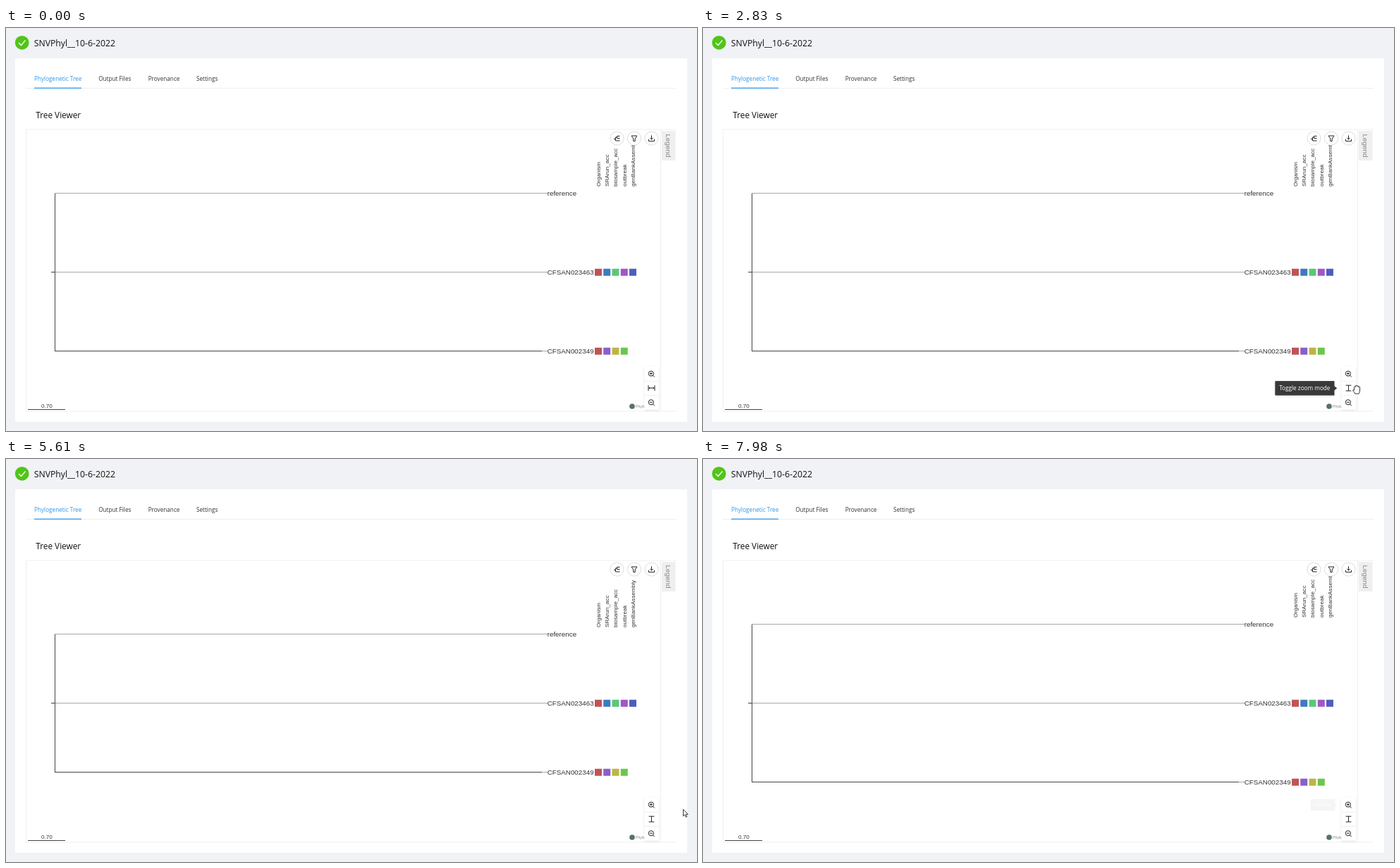
These frames come from a looping animation (980 px wide and 572 px high, 8900 ms). An HTML page:

```html
<!DOCTYPE html>
<html lang="en">
<head>
<meta charset="utf-8">
<title>Tree Viewer</title>
<style>
  html, body { margin: 0; width: 100%; height: 100%; overflow: hidden; background: #f0f2f5; }
  svg { display: block; width: 980px; height: 572px; }
  .ui { font-family: "Open Sans", "Noto Sans", sans-serif; }
  .head { font-weight: 500; fill: #111; }
  .plot { font-family: "Liberation Sans", Arial, sans-serif; fill: #333; }
  .line { fill: none; stroke: #222; }
  .soft { fill: none; stroke: #efefef; }
  .thin { fill: none; stroke: #a8a8a8; }
  .dark { fill: none; stroke: #444; }
  .mid { text-anchor: middle; }
</style>
</head>
<body>
<svg viewBox="0 0 980 572">
  <defs>
    <filter id="shade" x="-30%" y="-30%" width="160%" height="160%">
      <feDropShadow dx="0" dy="1" stdDeviation="1.5" flood-opacity=".14"/>
    </filter>
  </defs>
  <rect width="980" height="572" fill="#f0f2f5"/>
  <rect x="13" y="43" width="953" height="516" fill="#fff"/>

  <circle cx="22.7" cy="20.8" r="9.9" fill="#52c41a"/>
  <path d="M18 21l3.5 3.5 6-7" fill="none" stroke="#fff" stroke-width="1.3"/>
  <g class="ui">
    <text class="head" x="39.7" y="25.5" font-size="12.25">SNVPhyl__10-6-2022</text>
    <text class="head" x="42.3" y="128" font-size="11.8">Tree Viewer</text>
    <g id="tabs" font-size="8.2" fill="#333"></g>
  </g>
  <path class="soft" d="M28 85.5H951"/>
  <rect x="40" y="84.6" width="67" height="1.4" fill="#3f9cec"/>

  <path class="soft" d="M951 144H28.5V544H951M928.5 144V544"/>
  <rect x="930" y="146" width="19.5" height="42" fill="#efefef"/>
  <text class="plot" transform="translate(936.3 150.5) rotate(90)" font-size="9.9" style="fill:#858585">Legend</text>

  <g id="tree"></g>
  <path class="dark" d="M31 541.5H84"/>
  <text class="plot mid" x="57.8" y="539" font-size="8.1">0.70</text>
  <circle cx="888" cy="537" r="3.8" fill="#56716b"/>
  <text class="plot" x="893" y="539" font-size="5.2" style="fill:#888">Phylocanvas</text>

  <g fill="#fff" stroke="#dcdcdc">
    <circle cx="866.5" cy="156.6" r="9.6"/>
    <circle cx="891" cy="156.6" r="9.6"/>
    <circle cx="915.5" cy="156.6" r="9.6"/>
  </g>
  <g class="line">
    <path d="M870.6 153.4H866.6V156.6H870.6M866.6 155H864.5V160H870.6M862 157.6H864.5"/>
    <path d="M887 153H895L892.2 157V160.6H889.8V157Z"/>
    <path d="M915.5 152.3V158M913.3 156L915.5 158.2L917.7 156M911.5 157.8V160.6H919.5V157.8"/>
  </g>

  <rect x="905.5" y="480.5" width="20" height="61" rx="1.5" fill="#fff" filter="url(#shade)"/>
  <path class="soft" d="M906 501.2H925M906 521.4H925"/>
  <g class="line">
    <path id="wide" d="M911 507.2V515M920 507.2V515M911.5 511H919.5M913.3 509.8L912 511L913.3 512.2M917.7 509.8L919 511L917.7 512.2"/>
    <path id="tall" d="M911.6 507.2H919.4M911.6 515H919.4M915.5 507.2V515"/>
    <circle cx="914.9" cy="490.5" r="3.6"/>
    <path d="M917.5 493.1L919.8 495.4M913 490.5H916.8M914.9 488.6V492.4"/>
    <circle cx="914.9" cy="531.2" r="3.6"/>
    <path d="M917.5 533.8L919.8 536.1M913 531.2H916.8"/>
  </g>

  <g id="tips" class="ui"></g>
  <circle id="spot" r="7.7" fill="#fe0" fill-opacity=".6"/>
  <g id="cursor" fill="#fff" stroke="#222" stroke-width=".9" stroke-linejoin="round">
    <path id="arrow" d="M0 0V9.6L2.2 7.6L3.8 11.2L5.3 10.5L3.8 7.1H6.8Z"/>
    <path id="point" d="M-1.4 .6A1.4 1.4 0 0 1 1.4 .6V4.6L5 5.4Q6.8 6 6.7 8L5.5 13H-.3Q-1.2 10.8-3.6 8Q-3.8 6.2-1.4 7.2Z"/>
    <path id="grab" d="M-3.3 1V-3.4A1 1 0 0 1-1.3-3.4V-4.8A1 1 0 0 1 .7-4.8V-4.3A1 1 0 0 1 2.7-4.3V-3A1 1 0 0 1 4.7-3V2Q4.6 4 3.2 6H-2Q-3 4-5.2 1.6Q-5.6-.2-3.3 1Z"/>
  </g>
</svg>
<script>
const LOOP = 8900, MID = 346.5, HALF = 112, SHRINK = .934;
const $ = id => document.getElementById(id);

function add(parent, tag, attrs, text) {
  const el = document.createElementNS("http://www.w3.org/2000/svg", tag);
  for (const k in attrs) el.setAttribute(k, attrs[k]);
  if (text) el.textContent = text;
  return parent.appendChild(el);
}
const show = (el, on) => el.setAttribute("display", on ? "inline" : "none");
const move = (el, x, y) => el.setAttribute("transform", `translate(${x} ${y})`);
const clamp = v => Math.max(0, Math.min(1, v));

function addTab(x, label, fill = "#333") {
  add($("tabs"), "text", { x, y: 75, fill }, label);
}
addTab(40, "Phylogenetic Tree", "#2f96ec");
addTab(131.2, "Output Files");
addTab(201.7, "Provenance");
addTab(270, "Settings");

// Tree: the outer rows slide with the vertical zoom, the middle row stays
const tree = $("tree");
const stem = add(tree, "path", { class: "dark" });
const colX = i => 840 + 12.25 * i;

function addRow(name, colors, black) {
  const g = add(tree, "g", {});
  add(g, "path", { class: "thin", d: "M70 0H768" });
  if (black) add(g, "path", { class: "dark", d: "M69 0H760" });
  add(g, "text", { class: "plot", x: 767.7, y: 3.3, "font-size": 9.8 }, name);
  colors.forEach((fill, i) =>
    add(g, "rect", { x: colX(i) - 5, y: -4.8, width: 10, height: 10, fill }));
  return g;
}
const upper = addRow("reference", []);
const middle = addRow("CFSAN023463", ["#c05357", "#3f7ac0", "#58c878", "#a257c4", "#505dbc"]);
const lower = addRow("CFSAN002349", ["#c05357", "#8a5fca", "#bdb544", "#6cc64e"], true);
["Organism", "SRArun_acc", "biosample_acc", "outbreak", "genBankAssembly"].forEach((s, i) =>
  add(upper, "text", {
    class: "plot", "font-size": 8.1,
    transform: `translate(${colX(i) + 2.8} -9.5) rotate(-90)`
  }, s));
move(middle, 0, MID);

// Clicks: each zoom step lands halfway through its highlight
const toggle = { from: 1920, to: 2020, zoom: 0 };
const clicks = [
  toggle,
  { from: 3860, to: 3940, zoom: 1 },
  { from: 4700, to: 4830, zoom: 1 },
  { from: 6360, to: 6570, zoom: -1 },
  { from: 7120, to: 7250, zoom: -1 }
];

function drawTree(t) {
  const level = clicks.reduce((n, c) => n + (t >= (c.from + c.to) / 2 ? c.zoom : 0), 0);
  const half = Math.round(HALF * SHRINK ** level);
  move(upper, 0, MID - half);
  move(lower, 0, MID + half);
  stem.setAttribute("d", `M69.5 ${MID - half}V${MID + half}M64 ${MID}H69.5`);
}

// Tooltips grow from the arrow tip while fading; "rest" is what stays visible
function addTip(text, y, w, start, end, rest = 0) {
  const el = add($("tips"), "g", {});
  add(el, "path", {
    d: `M-4 -10.2H${-3 - w}q-1.2 0-1.2 1.2V9q0 1.2 1.2 1.2H-4V3L-.3 0L-4 -3Z`,
    fill: "#000", "fill-opacity": .75, filter: "url(#shade)"
  });
  add(el, "text", { class: "mid", x: -4.2 - w / 2, y: 3, "font-size": 8.2, fill: "#fff" }, text);
  return t => {
    const grow = 1 - (1 - clamp((t - start) / 100)) ** 4;
    const on = grow * Math.max(rest, 1 - clamp((t - end) / 100));
    show(el, on > 0);
    el.setAttribute("opacity", on);
    el.setAttribute("transform", `translate(899.5 ${y}) scale(${.8 + .2 * on})`);
  };
}
const tips = [
  addTip("Toggle zoom mode", 511.2, 84, 1270, 3040),
  addTip("Zoom out", 531.6, 45.5, 3600, 5430),
  addTip("Zoom in", 491, 42.5, 6070, 7885, .05)
];

// Pointer trips: curves from a to b, bent towards via; it rests at b
const trips = [
  { from: 380, to: 1130, a: [958, 568], via: [942, 513], b: [921.5, 510.6] },
  { from: 2830, to: 3700, a: [926.8, 513], via: [953, 545], b: [917, 536] },
  { from: 5320, to: 6170, a: [917, 536], via: [1013, 462], b: [919, 489.6] },
  { from: 7730, to: 7900, a: [922, 490], via: [950, 496], b: [984, 503] }
];

function drawCursor(t) {
  const trip = trips.filter(p => t >= p.from).pop();
  const hit = clicks.some(c => t >= c.from && t < c.to);
  show($("cursor"), trip);
  show($("spot"), hit);
  if (!trip) return;
  const k = clamp((t - trip.from) / (trip.to - trip.from)), r = 1 - k;
  const [x, y] = trip.a.map((a, i) => r * r * a + 2 * r * k * trip.via[i] + k * k * trip.b[i]);
  move($("cursor"), x, y);
  move($("spot"), x, y);
  // Hand over the buttons, grab at the canvas edge, arrow beyond
  show($("arrow"), x >= 927.5);
  show($("grab"), x >= 926 && x < 927.5);
  show($("point"), x < 926);
}

function draw(t) {
  drawTree(t);
  tips.forEach(tip => tip(t));
  drawCursor(t);
  show($("wide"), t < toggle.to);
  show($("tall"), t >= toggle.to);
}

const begin = performance.now();
function tick() {
  draw((performance.now() - begin) % LOOP);
  requestAnimationFrame(tick);
}
tick();
</script>
</body>
</html>
```
